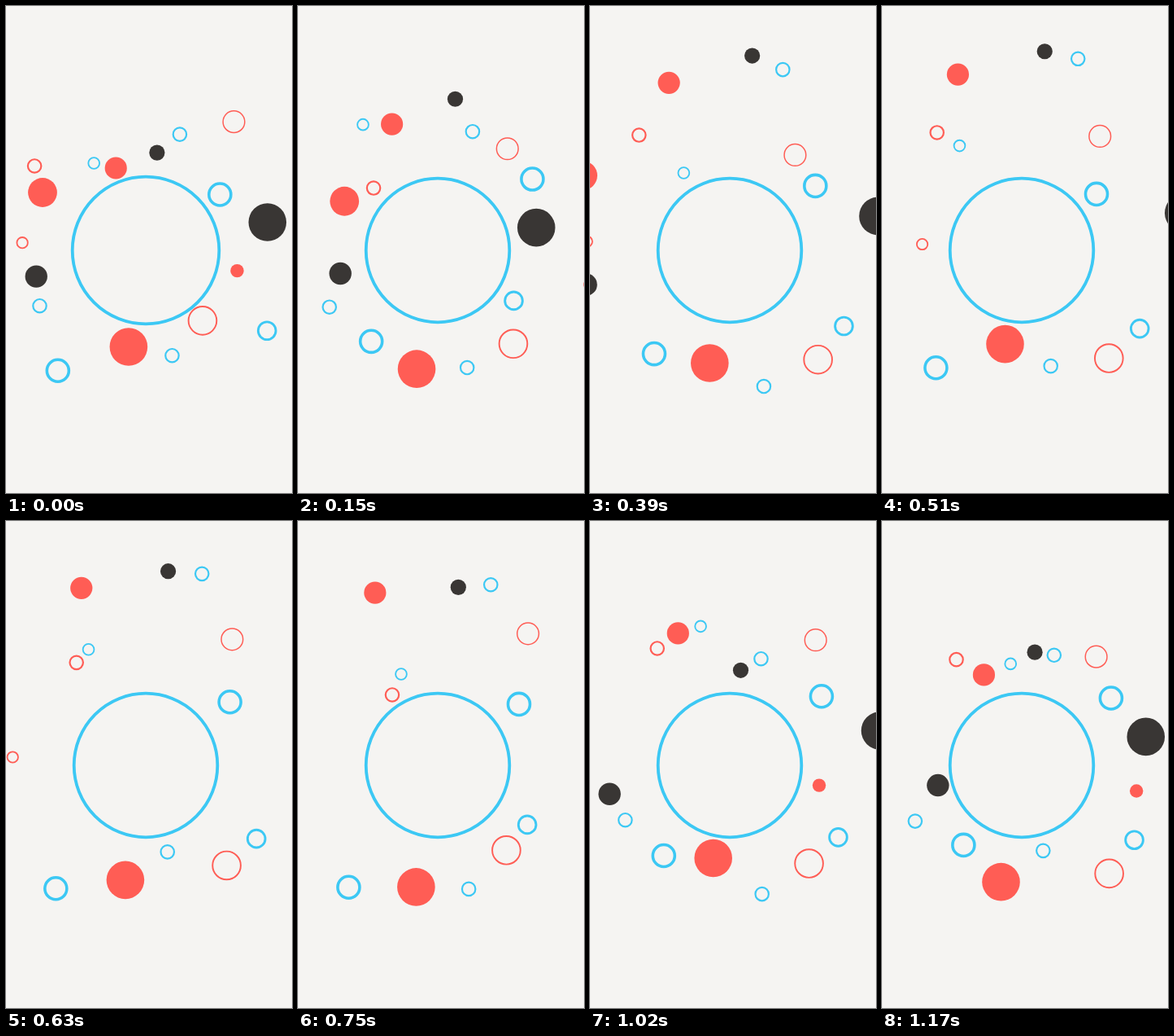
Recreate the animation shown at these times as an HTML page with a canvas. Size 352x598 px, loop 1.2 s.

```html
<!DOCTYPE html>
<html lang="en">
<head>
<meta charset="utf-8">
<title>Bouncing dots</title>
<style>
  html, body { margin: 0; width: 100%; height: 100%; overflow: hidden; background: #f5f4f2; }
  canvas { display: block; width: 352px; height: 598px; }
</style>
</head>
<body>
<canvas id="stage"></canvas>
<script>
const W = 352, H = 598, LOOP = 1200, STEP = 30;
const CX = 172, CY = 300, RIM = 91;
const RED = '#ff5d55', BLUE = '#3cc8f4', DARK = '#393634';

const canvas = document.getElementById('stage');
const ctx = canvas.getContext('2d');
const scale = window.devicePixelRatio || 1;
canvas.width = W * scale;
canvas.height = H * scale;

// Line width grows with the dot; weight 0 is a filled disc.
const dots = [];
const style = (color, weight) => (size, angle, lift, ...bounces) =>
  dots.push({ color, size, line: size * weight, angle, lift, bounces });

const blueRing = style(BLUE, 0.23);
const redRing = style(RED, 0.23);
const thinRing = style(RED, 0.104);
const redDisc = style(RED, 0);
const darkDisc = style(DARK, 0);

const ramp = (t, from, to) => Math.min(1, Math.max(0, (t - from) / (to - from)));

// size, direction in degrees, height of a one-second hop, times of touching the rim in ms
blueRing(15.5, -36.9, 172, -22, 475, 845, 1305);
blueRing(15.5, 126.2, 105, -772, 228, 1108, 1708);
blueRing(12.5, 33.5, 165, -665, 165, 820, 1440);
blueRing(9.5, -73.6, 138.5, -1444, 56, 1083, 1963);
blueRing(9.5, 152.4, 133, -1443, 57, 1102, 2402);
blueRing(9.5, 75.9, 228, -820, 41, 613, 1184);
blueRing(8, t => -120.8 + 24.5 * ramp(t, 510, 1170), 425, -35, 405, 785, 1208);
redRing(9.5, t => -121.8 - 21.1 * (1 - t / LOOP) ** 3, 217, -590, 133, 745, 1307);
redRing(7.8, -176.5, 244, -95, 548, 1400);
thinRing(18.5, 51, 92, 5, 835);
thinRing(14.3, -55.5, 77.4, -975, 275, 1365);
redDisc(23.5, 100.1, 137, -20, 502);
redDisc(18.1, t => -150.8 - 2.3 * ramp(t, 0, 230), 58.6, 97, 1697);
redDisc(13.8, t => -110 - 3 * ramp(t, 850, LOOP), 86.5, -6, 1206);
redDisc(8.4, 12.6, 142, -25, 1041, 1761);
darkDisc(23.5, -12.95, 71.7, 122, 1303);
darkDisc(13.9, 166.6, 82.7, 99, 1167);
darkDisc(9.8, -83.4, 123, -36, 1050, 1800);

// A longer hop goes higher, like a ball under constant pull.
// The first and last hop repeat beyond the ends of the list.
function height(bounces, lift, t) {
  let i = 1;
  while (i < bounces.length - 1 && t >= bounces[i]) i++;
  const gap = bounces[i] - bounces[i - 1];
  const phase = (t - bounces[i - 1]) / gap;
  const u = Math.abs(2 * (phase - Math.floor(phase)) - 1);
  return lift * (gap / 1000) ** 2 * (1 - u ** 2.15);
}

function circle(x, y, size, color, line) {
  ctx.beginPath();
  ctx.arc(x, y, size - line / 2, 0, Math.PI * 2);
  if (line) {
    ctx.strokeStyle = color;
    ctx.lineWidth = line;
    ctx.stroke();
  } else {
    ctx.fillStyle = color;
    ctx.fill();
  }
}

function draw(t) {
  ctx.setTransform(scale, 0, 0, scale, 0, 0);
  ctx.fillStyle = '#f5f4f2';
  ctx.fillRect(0, 0, W, H);
  circle(CX, CY, 90.2 + 2 * (1 - ramp(t, 0, 90)), BLUE, 3.8);
  for (const { color, size, line, angle, lift, bounces } of dots) {
    const a = (typeof angle === 'function' ? angle(t) : angle) * Math.PI / 180;
    const d = RIM + size + height(bounces, lift, t);
    circle(CX + d * Math.cos(a), CY + d * Math.sin(a), size - 0.2, color, line);
  }
}

const begin = performance.now();
function frame() {
  const t = (performance.now() - begin) % LOOP;
  draw(Math.floor(t / STEP) * STEP);
  requestAnimationFrame(frame);
}
frame();
</script>
</body>
</html>
```
